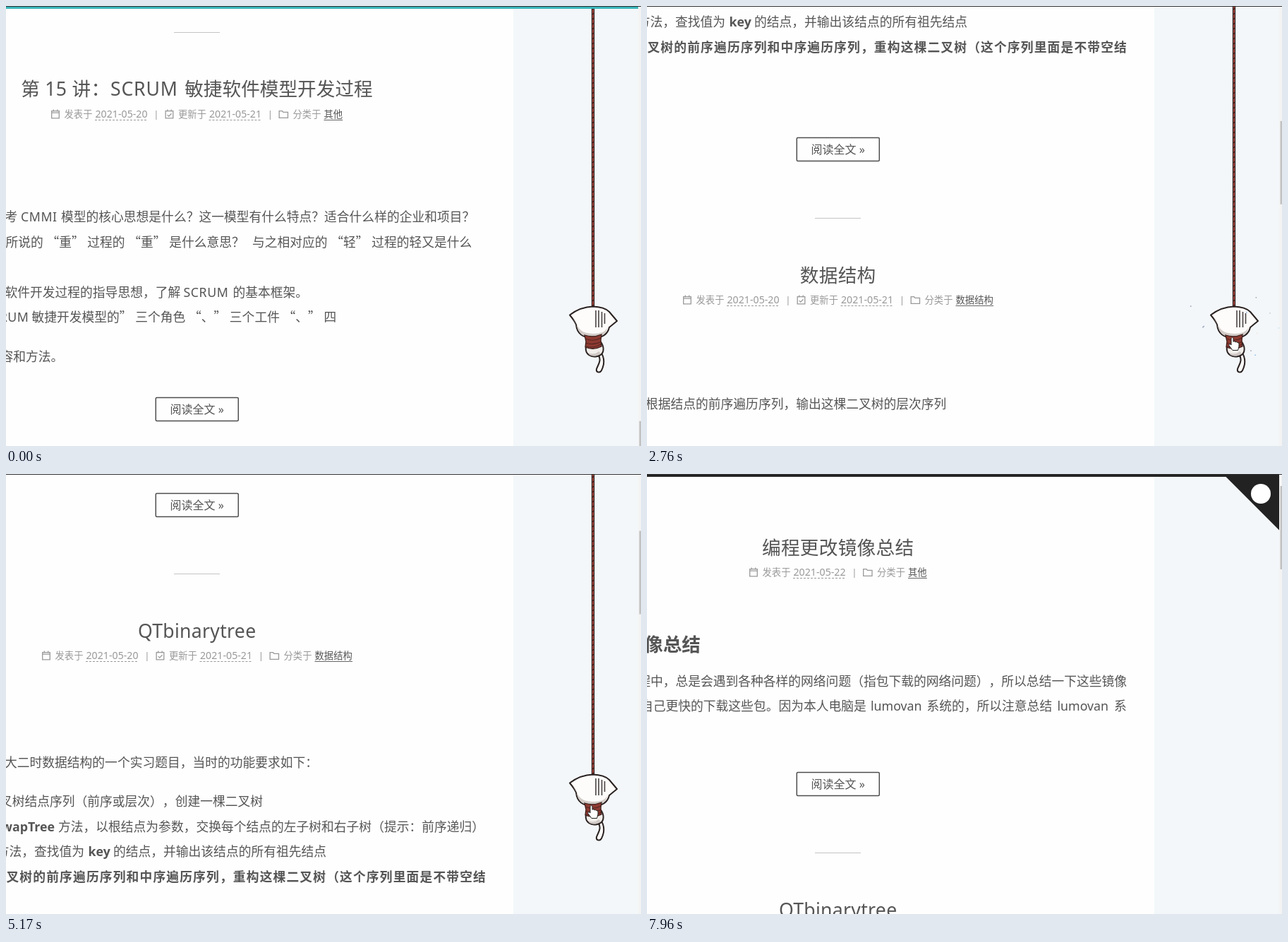
Animation, 900 px wide and 623 px high, one loop 9040 ms. Source, as an HTML page:

```html
<!DOCTYPE html>
<html lang="zh-CN">
<head>
<meta charset="utf-8">
<title>Blog scroll</title>
<style>
html, body { margin: 0; width: 100%; height: 100%; overflow: hidden; background: #fefefe; }
svg { display: block; width: 100%; height: 100%; }
text { font: 17.78px 'Noto Sans', 'Noto Sans CJK SC', sans-serif; fill: #555; white-space: pre; text-spacing-trim: space-all; }
.bold { font-weight: 700; }
.loose { letter-spacing: .064em; }
.latin { letter-spacing: .01em; }
.caps { letter-spacing: .03em; }
.title { font-size: 26.67px; }
.meta { font-size: 13.33px; fill: #999; }
.date { font-size: 14.2px; fill: #999; }
.cat { font-size: 13.33px; }
.btn { font-size: 16px; }
.wide { font-family: 'Noto Sans CJK SC', sans-serif; }
.end { text-anchor: end; }
.mid { text-anchor: middle; }
.icon { fill: none; stroke: #999; stroke-width: 1.3; }
</style>
</head>
<body>
<svg viewBox="0 0 900 623" lang="zh-CN">
  <defs>
    <pattern id="twist" width="4" height="7" patternUnits="userSpaceOnUse" x="830">
      <rect width="4" height="7" fill="#a5443b"/>
      <path d="M0 5.5L4 2.5" stroke="#40201e" stroke-width="1.4"/>
    </pattern>
  </defs>
  <rect width="900" height="623" fill="#fefefe"/>
  <rect x="719" width="181" height="623" fill="#f3f7fa"/>
  <g id="page"></g>
  <g id="cat">
    <rect x="830" y="-200" width="4" height="627" fill="url(#twist)"/>
    <path d="M830.4 -200V427M833.6 -200V427" stroke="#2e2020" stroke-width="1.1"/>
    <g stroke="#2a2221" stroke-width="2" stroke-linejoin="round" stroke-linecap="round">
      <path d="M839 494C845 501 839 508 837 514C836 519 842 520 844 516C848 508 849 499 843 490Z" fill="#fbfaf8"/>
      <path d="M822 482C820 494 830 498 838 496C847 494 849 486 844 477Z" fill="#f1eeeb"/>
      <path d="M799 437.5Q814 426 832 425.5Q848 426 855 433L866 446L855 455C853 464 847 470 832 470C815 470 809 462 808 451Q806 446 799 437.5Z" fill="#fdfcfa"/>
    </g>
    <path d="M803 442L809 450C812 461 822 464 833 464Q848 464 852 456C851 464 845 469 832 469C817 469 810 462 809 451Z" fill="#d3ccc8"/>
    <path d="M825 491Q834 495 840 489L843 492Q835 498 827 494Z" fill="#cfc8c4"/>
    <path d="M836 431V455M840 431V455M844.5 433V455M848.5 435V450" stroke="#494342" stroke-width="1.6"/>
    <path d="M820 466Q832 470 844 465L843 473L844 482Q833 488 821 483L822 475Z" fill="#8d3a31" stroke="#3a201d" stroke-width="1.3"/>
    <path d="M821 471Q833 476 843 470M821 477Q833 481 844 475M822 482Q834 485 843 479" fill="none" stroke="#562722" stroke-width="1.1"/>
  </g>
  <g id="sparks"></g>
  <rect id="progress" y="1" height="3" fill="#38b6bb"/>
  <rect x="896" width="4" height="623" fill="#f3f3f3"/>
  <rect id="thumb" x="897.5" width="2.5" height="118" fill="#c1c1c1"/>
  <rect width="900" height="1" fill="#333"/>
  <g id="cursor" fill="#fff" stroke="#222" stroke-linejoin="round">
    <path id="arrow" d="M.5 .5V12.5L3.4 9.8L5.6 14.8L7.6 14L5.5 9.2H9.2Z"/>
    <path id="hand" d="M0 1.5Q1.5 -1 3 1.5V6.2Q5 5 6 6.8Q8 6 9 7.6Q11 7 11 9.5V13L9.5 18.5H2L-3.2 11.5Q-3.5 9 -1.5 9.8L0 11Z"/>
  </g>
</svg>
<script>
const $ = id => document.getElementById(id);
const CENTER = 270.7, LOOP = 9040;

// y is the visual middle of the line
function text(x, y, str, cls = '') {
  const size = /title/.test(cls) ? 26.67 : /meta|date|cat/.test(cls) ? 13.33 : 17.78;
  const body = str.replace(/[“”]/g, q => `<tspan class="wide">${q}</tspan>`);
  return `<text x="${x}" y="${y + size * 0.37}" class="${cls}">${body}</text>`;
}
const line = (y, ...parts) => parts.map(([x, str, cls]) => text(x, y, str, cls)).join('');

function calendar(x, y, checked) {
  const tick = checked ? 'M3.2 7.6L5.3 9.6L9 5.8' : 'M.7 4.6H11.3';
  return `<path class="icon" transform="translate(${x} ${y - 6.5})" d="M.7 2.2H11.3V12.3H.7ZM3.3 0V3M8.7 0V3${tick}"/>`;
}
const folder = (x, y) =>
  `<path class="icon" transform="translate(${x} ${y - 5})" d="M.7 .7H5L6.5 2.4H13V10.3H.7Z"/>`;

function dated(x, y, label, date, checked) {
  return calendar(x, y, checked) + text(x + 18.5, y, label, 'meta') + text(x + 62.5, y, date, 'date') +
    `<path d="M${x + 62} ${y + 8.5}h75" stroke="#999" stroke-dasharray="3 2"/>` +
    text(x + 145.2, y, '|', 'meta');
}

function meta(x, y, category, date, updated) {
  let out = dated(x, y, '发表于', date);
  if (updated) out += dated(x += 161.5, y, '更新于', updated, true);
  return out + folder(x + 161, y) + text(x + 181, y, '分类于', 'meta') + text(x + 225, y, category, 'cat') +
    `<path d="M${x + 225} ${y + 8.5}h${category.length * 13.4}" stroke="#666"/>`;
}

const title = (y, str) => text(CENTER, y, str, 'title mid latin');
const old = ['2021-05-20', '2021-05-21'];

// "Read more" button and the divider under it
const footer = y => `<rect x="212.3" y="${y - 16.5}" width="117" height="33" rx="1.5" fill="none" stroke="#4d4d4d" stroke-width="1.5"/>` +
  `<text x="${CENTER}" y="${y + 6}" class="btn mid">阅读全文 »</text>` +
  `<rect x="238" y="${Math.floor(y + 97)}" width="65" height="1" fill="#c4c4c4"/>`;

$('page').innerHTML = [
  '<rect y="1" width="896" height="3" fill="#222"/><path d="M820 3.5H896V79.5Z" fill="#222"/><circle cx="870" cy="28" r="14" fill="#fff"/>',
  title(104, '编程更改镜像总结'), meta(145, 139, '其他', '2021-05-22'),
  text(76, 241, '编程更改镜像总结', 'title bold end'),
  text(680, 293, '程中，总是会遇到各种各样的网络问题（指包下载的网络问题），所以总结一下这些镜像', 'end'),
  line(328.5, [-9, '自己更快的下载这些包。因为本人电脑是'], [317, 'lumovan'], [396.5, '系统的，所以注意总结'], [581.5, 'lumovan'], [662, '系']),
  footer(439),

  title(617, 'QTbinarytree'), meta(51, 652, '数据结构', ...old),
  text(-2, 803, '大二时数据结构的一个实习题目，当时的功能要求如下：'),
  text(364, 858.5, '叉树结点序列（前序或层次），创建一棵二叉树', 'end'),
  line(894, [69, 'SwapTree', 'bold end'], [74, '方法，以根结点为参数，交换每个结点的左子树和右子树（提示：前序递归）']),
  line(929.5, [111, '方法，查找值为', 'end'], [116.5, 'key', 'bold'], [152, '的结点，并输出该结点的所有祖先结点']),
  text(681, 965, '叉树的前序遍历序列和中序遍历序列，重构这棵二叉树（这个序列里面是不带空结', 'bold end loose'),
  footer(1110),

  title(1288, '数据结构'), meta(51, 1323, '数据结构', ...old),
  [0, 1, 2, 3].map(i => text(-2, 1470 + i * 142, '根据结点的前序遍历序列，输出这棵二叉树的层次序列')).join(''),
  footer(2179),

  title(2357, 'android 环境配置'), meta(51, 2392, '其他', ...old),
  text(216, 2494, 'android 环境配置', 'title bold end'),
  text(17, 2562, '环境配置', 'title bold end'),
  text(185, 2674, '下载自己需要的 java 版本', 'end'),
  footer(2749.5),

  title(2927, '神经网络'), meta(51, 2961.5, '机器学习', ...old),
  text(-2, 3180, '神经网络的基本结构和学习过程总结'),
  footer(3490),

  line(3667.5, [21.2, '第 15 讲：', 'title latin'], [148, 'SCRUM', 'title caps'], [253.2, '敏捷软件模型开发过程', 'title']),
  meta(64, 3703, '其他', ...old),
  line(3848, [-1.5, '考'], [21, 'CMMI', 'caps'], [78, '模型的核心思想是什么？这一模型有什么特点？适合什么样的企业和项目？']),
  line(3884, [-.5, '所说的 “重” 过程的 “重” 是什么意思？'], [349, '与之相对应的 “轻” 过程的轻又是什么']),
  line(3955, [-1.5, '软件开发过程的指导思想，了解'], [251.5, 'SCRUM', 'caps'], [321.5, '的基本框架。']),
  line(3990.5, [32.5, 'SCRUM', 'caps end'], [36.5, '敏捷开发模型的” 三个角色 “、” 三个工件 “、” 四']),
  text(-7.5, 4046, '容和方法。'),
  footer(4121)
].join('');

// Dots at 280 ms after the click: x, y, colour
const GREY = '#9299a8', BLUE = '#80b1e2', PALE = '#bfdcf5', VIOLET = '#8494c4';
const bursts = [
  { start: 2140, dots: [[782, 434, GREY], [857, 424, GREY], [873, 442, '#c3cbd3'], [883, 459, PALE], [797, 457, VIOLET],
    [796, 458, GREY], [846, 441, BLUE], [851, 485, GREY], [856, 490, BLUE], [858, 465, '#f3e4dc']] },
  { start: 6720, dots: [[771, 433, GREY], [776, 451, BLUE], [796, 450, GREY], [788, 461, '#a99aa0'], [783, 475, '#f2d780'],
    [797, 486, '#86a8d6'], [814, 431, BLUE], [827, 434, PALE], [817, 444, PALE], [871, 472, BLUE], [887, 462, BLUE], [811, 474, PALE]] }
];

function sparks(t) {
  const burst = bursts.find(b => t >= b.start && t < b.start + 850);
  if (!burst) return '';
  const age = t - burst.start + 20;
  const spread = (1 - Math.exp(-age / 200)) / (1 - Math.exp(-1.5));
  const r = 3.2 * (1 - age / 870);
  return burst.dots.map(([x, y, color]) =>
    `<circle cx="${830 + (x - 830) * spread}" cy="${472 + (y - 472) * spread}" r="${r}" fill="${color}"/>`).join('');
}

const linear = p => p, easeOut = p => 1 - (1 - p) ** 2;
function valueAt(keys, t, ease = linear) {
  const i = keys.findIndex(k => k[0] > t);
  if (i < 0) return keys[keys.length - 1][1];
  if (!i) return keys[0][1];
  const [t0, a] = keys[i - 1], [t1, b] = keys[i];
  return a + (b - a) * ease((t - t0) / (t1 - t0));
}

const scrollKeys = [[2130, 3550], [2416, 2480], [2960, 0], [4500, 0], [4950, 330], [5160, 395],
  [5740, 395], [5960, 150], [6050, 99], [6700, 99], [6996, 62], [7400, 0]];
const catKeys = [[2920, 0], [3275, -530], [4520, -530], [5120, 0], [7290, 0], [7615, -530]];
const cursorX = [[640, 866], [1205, 828], [7760, 828], [7960, 852]];
const cursorY = [[640, 622], [1205, 469], [7760, 469], [7960, 630]];

const anchors = [0, 660, 2140, 3140, 4540, 5780, 6720, 7830], TICK = 69;
function snap(t) {
  const start = anchors.filter(a => a <= t).pop();
  return start + Math.floor((t - start + 8) / TICK) * TICK;
}

const show = (el, on) => el.setAttribute('visibility', on ? 'visible' : 'hidden');
const move = (el, x, y) => el.setAttribute('transform', `translate(${x} ${y})`);

function draw(now) {
  const t = snap(now % LOOP);
  const scroll = Math.round(valueAt(scrollKeys, t));
  const catY = valueAt(catKeys, t, easeOut);
  const y = valueAt(cursorY, t, easeOut);
  const visible = t >= 660 && t < 7955;
  const overCat = y < 515 && catY > -48;
  move($('page'), 0, -scroll);
  move($('cat'), 0, catY);
  move($('cursor'), valueAt(cursorX, t, easeOut), y);
  show($('hand'), visible && overCat);
  show($('arrow'), visible && !overCat);
  $('progress').setAttribute('width', 896 * Math.max(0, (scroll - 1150) / 2400));
  $('thumb').setAttribute('y', 17 + scroll / 6.22);
  $('sparks').innerHTML = sparks(t);
}

const begin = performance.now();
function loop() {
  draw(performance.now() - begin);
  requestAnimationFrame(loop);
}
loop();
</script>
</body>
</html>
```
